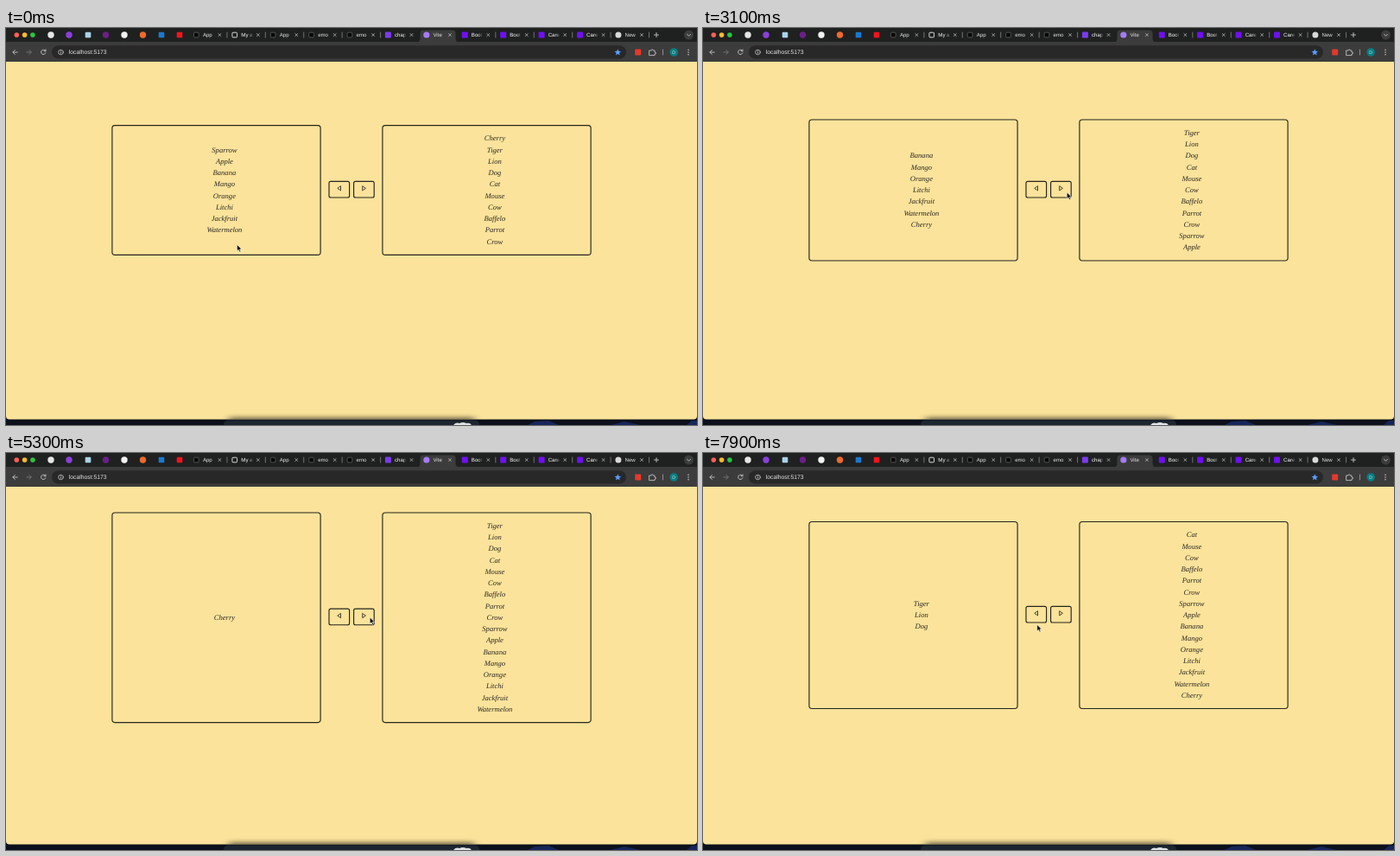
An HTML page for the animation above (8000 ms loop, 800x459 px).

```html
<!DOCTYPE html>
<html lang="en">
<head>
<meta charset="utf-8">
<title>List transfer</title>
<style>
  html, body { margin: 0; width: 100%; height: 100%; overflow: hidden; background: #0b101c; }
  svg { display: block; width: 800px; height: 459px; text-rendering: geometricPrecision; }
  .ui { font-family: "Liberation Sans", Roboto, sans-serif; fill: #e3e3e3; }
  .item { font: italic 8.55px "Apple Chancery", "Liberation Serif", serif; fill: #2b2822; text-anchor: middle; }
  .line { fill: none; stroke: #c7c7c7; stroke-linecap: round; stroke-linejoin: round; }
  .frame { fill: none; stroke: #27241d; stroke-width: 1.15; }
</style>
</head>
<body>
<svg id="stage" viewBox="0 0 800 459" xmlns="http://www.w3.org/2000/svg">
  <defs>
    <linearGradient id="fade">
      <stop offset=".65" stop-color="#fff"/>
      <stop offset="1" stop-color="#fff" stop-opacity="0"/>
    </linearGradient>
    <filter id="soft" x="-20%" y="-200%" width="140%" height="500%"><feGaussianBlur stdDeviation="5 2.5"/></filter>
    <clipPath id="pageClip"><path d="M0 39H800V448.500Q800 452.500 796 452.500H4Q0 452.500 0 448.500Z"/></clipPath>
  </defs>

  <rect width="800" height="459" fill="#0b101c"/>
  <g clip-path="url(#pageClip)">
    <rect y="39" width="800" height="414" fill="#fbe39b"/>
    <rect x="258" y="450" width="284" height="8" fill="#4a4330" opacity=".75" filter="url(#soft)"/>
  </g>
  <rect x="252" y="453.500" width="296" height="12" rx="5" fill="#1c2530"/>
  <path d="M518 459Q521 455.500 525 457Q529 455 533 457Q537 456 539 459Z" fill="#dfe3e6"/>
  <path d="M604 459L612 455L628 454L640 459ZM700 459L716 455L734 459ZM788 459L794 454H800V459Z" fill="#16265a"/>

  <rect width="800" height="17" fill="#1f2020"/>
  <rect y="16" width="800" height="23" fill="#3c3c3c"/>
  <path d="M476 16.500Q479.500 16 479.500 12V6Q479.500 2.500 483 2.500H517Q520.500 2.500 520.500 6V12Q520.500 16 524 16.500Z" fill="#3c3c3c"/>
  <rect x="53" y="20.300" width="665" height="15.200" rx="7.600" fill="#282828"/>
  <g id="chrome"></g>
  <g id="page"></g>
  <g id="cursor">
    <g id="denied">
      <circle cx="4" cy="10" r="3.500" fill="#d5d3cd" stroke="#66645f" stroke-width="1"/>
      <path d="M1.700 7.700L6.300 12.300" stroke="#66645f" stroke-width="1"/>
    </g>
    <path d="M0 0V7.300L1.750 5.800L2.900 8.500L4.200 7.950L3.050 5.350H5.300Z" fill="#000" stroke="#fff" stroke-width=".55"/>
  </g>
</svg>
<script>
const LOOP = 8000, STEP = 100;
const ROW = 13.25, MID = 187.5, MIN_TOP = 69;
const $ = id => document.getElementById(id);

function add(parent, tag, attrs, text) {
  const el = document.createElementNS("http://www.w3.org/2000/svg", tag);
  for (const key in attrs) el.setAttribute(key, attrs[key]);
  if (text) el.textContent = text;
  parent.append(el);
  return el;
}

// Browser bar
const chrome = $("chrome");
const dot = (x, y, r, fill) => add(chrome, "circle", { cx: x, cy: y, r, fill });
const square = (x, y, s, fill, more) =>
  add(chrome, "rect", { x: x - s / 2, y: y - s / 2, width: s, height: s, rx: 1, fill, ...more });
const line = (d, more) => add(chrome, "path", { class: "line", d, "stroke-width": 0.9, ...more });
const label = (x, y, size, text, more) =>
  add(chrome, "text", { class: "ui", x, y, "font-size": size, ...more }, text);

["#ff5f57", "#febc2e", "#28c840"].forEach((c, i) => dot(12.3 + i * 9.3, 8, 2.8, c));
const pinned = [
  [52, "#e6e6e6", 1], [73, "#8b3fd9", 1], [95, "#a9d3ea", 0], [115.500, "#6b1f87", 1],
  [137, "#f2f2f2", 1], [158.500, "#ef6a2c", 1], [180, "#1b78d0", 0], [201, "#f5141c", 0]
];
for (const [x, c, round] of pinned) round ? dot(x, 8, 3.7, c) : square(x, 8, 6.6, c);

const tabs = [
  ["App", "box"], ["My a", "hollow"], ["App", "box"], ["emo", "box"], ["emo", "box"], ["chap", "#7c3aed"],
  ["Vite", "disc"], ["Boot", "#6f10f2"], ["Boot", "#6f10f2"], ["Care", "#6f10f2"], ["Care", "#6f10f2"], ["New", "pale"]
];
tabs.forEach(([name, icon], i) => {
  const x = 220.3 + i * 44.42;
  if (icon === "box") square(x, 8, 5.6, "#080808", { stroke: "#777", "stroke-width": 0.6 });
  else if (icon === "hollow") square(x, 8, 5.6, "none", { stroke: "#eee", "stroke-width": 0.9 });
  else if (icon === "disc") dot(x, 8, 3.6, "#a67bf5");
  else if (icon === "pale") dot(x, 8, 3.5, "#d9d9d9");
  else square(x, 8, 7, icon);
  label(x + 7.6, 10.1, 6.1, name, name.length > 3 && name !== "Vite" ? { style: "fill:url(#fade)" } : {});
  line(`M${x + 25.6} 6.500l3 3m0 -3l-3 3`, { "stroke-width": 0.7 });
  if (i !== 5 && i !== 6) line(`M${x + 35.6} 5v6`, { "stroke-width": 0.5, stroke: "#555" });
});
line("M753 5.500v5M750.500 8h5");
dot(790.5, 8, 5.5, "#3c3c3c");
line("M788.500 7.200l2 2l2 -2");

const hover = dot(43.3, 28, 7.8, "#5f5f5f");
line("M13.200 28H8M10.400 25.500L7.900 28L10.400 30.500");
line("M24 28h5.200M26.800 25.500L29.300 28L26.800 30.500", { style: "stroke:#777" });
line("M45.700 26.500A2.700 2.700 0 1 0 45.900 28.800M46 24.900V26.800H44.100");
add(chrome, "circle", { class: "line", cx: 63.5, cy: 28, r: 2.8, "stroke-width": 0.8 });
line("M63.500 27.800v1.500M63.500 26.400v.1", { "stroke-width": 0.8 });
label(72.8, 30.3, 6.8, "localhost:5173");
const star = [...Array(10)].map((_, i) => {
  const a = i * Math.PI / 5, r = i % 2 ? 1.8 : 4;
  return [708.3 + r * Math.sin(a), 28.2 - r * Math.cos(a)];
});
add(chrome, "polygon", { points: star.join(" "), fill: "#5b9cff" });
square(731.7, 28, 7, "#e4392d");
line("M745 26h2.100a1.100 1.100 0 1 1 2.200 0h1.700v2a1.100 1.100 0 1 1 0 2.100v1.500h-6z", { "stroke-width": 0.85 });
line("M760.500 25v6", { stroke: "#666", "stroke-width": 0.6 });
dot(773.2, 28, 4.8, "#087e83");
label(773.2, 30, 5.2, "D", { "text-anchor": "middle" });
[25.3, 28, 30.7].forEach(y => dot(790, y, 0.75, "#d0d0d0"));

// Lists
const fruits = "Apple Banana Mango Orange Litchi Jackfruit Watermelon Cherry".split(" ");
const animals = "Tiger Lion Dog Cat Mouse Cow Baffelo Parrot Crow Sparrow".split(" ");
const RELOAD = 1400;
const toRight = [2900, 3400, 3800, 4200, 4700, 5000, 5300, 5600];
const toLeft = [7100, 7500, 7800];
const SELECT = 5900;

function listsAt(t) {
  if (t < RELOAD) {
    return [["Sparrow", ...fruits.slice(0, -1)], ["Cherry", ...animals.slice(0, -1)]];
  }
  const left = [...fruits], right = [...animals];
  for (const at of toRight) if (t >= at) right.push(left.shift());
  for (const at of toLeft) if (t >= at) left.push(right.shift());
  return [left, right];
}

const page = $("page");

function drawList(items, x, top, height) {
  add(page, "rect", { class: "frame", x, y: top, width: 241.2, height, rx: 3.2 });
  const first = top + height / 2 - (items.length - 1) * ROW / 2 + 2.6;
  items.forEach((name, i) => add(page, "text", { class: "item", x: x + 130, y: first + i * ROW }, name));
}

function drawButton(x, mid, dir, disabled) {
  add(page, "rect", { class: "frame", x, y: mid - 9.3, width: 23.6, height: 18.6, rx: 2 });
  const cx = x + 11.8, cy = mid - 1.4;
  add(page, "path", {
    d: `M${cx + dir * 2} ${cy}L${cx - dir * 1.7} ${cy - 2.6}V${cy + 2.6}Z`,
    fill: "none", stroke: disabled ? "#8a8983" : "#27241d", "stroke-width": 0.85
  });
}

function drawPage(t) {
  const [left, right] = listsAt(t);
  const height = Math.max(left.length, right.length) * ROW + 17.3;
  const top = Math.max(MIN_TOP, MID - height / 2);
  const mid = top + height / 2;
  const empty = left.length === 0;
  const shift = empty ? 0.5 : 0;
  page.replaceChildren();
  if (empty && t >= SELECT) {
    add(page, "rect", {
      x: 402, y: top - 9.7, width: 24.8, height: height + 19, rx: 1,
      fill: "#c3c2c0", stroke: "#aaa79d", "stroke-width": 0.6
    });
  }
  drawList(left, 122.9 - shift, top, height);
  drawList(right, 435.9 + shift, top, height);
  drawButton(374 - shift, mid - 0.8, -1, false);
  drawButton(402.6, mid - 0.8, 1, empty);
}

// Pointer: time, x, y
const path = [
  [0, 267.5, 250.5], [200, 267.5, 250.5], [1100, 46.7, 34], [1500, 46.7, 34],
  [2600, 421.3, 190], [5600, 421.3, 190], [5900, 420.3, 188.6], [6300, 420.3, 188.6],
  [6900, 386.8, 198.5], [LOOP, 386.8, 198.5]
];

function pointerAt(t) {
  const i = path.findIndex(p => p[0] > t);
  const [t0, x0, y0] = path[i - 1], [t1, x1, y1] = path[i];
  const k = (t - t0) / (t1 - t0), e = k * k * (3 - 2 * k);
  return [x0 + (x1 - x0) * e, y0 + (y1 - y0) * e];
}

let shown = -1;
function tick(now) {
  const t = Math.floor(now % LOOP / STEP) * STEP;
  if (t !== shown) {
    shown = t;
    drawPage(t);
    const [x, y] = pointerAt(t);
    $("cursor").setAttribute("transform", `translate(${x} ${y})`);
    const onReload = Math.hypot(x - 43.3, y - 28) < 9;
    hover.setAttribute("visibility", onReload ? "visible" : "hidden");
    const denied = t >= toRight[7] && t < toLeft[0] && x > 402;
    $("denied").setAttribute("visibility", denied ? "visible" : "hidden");
  }
  requestAnimationFrame(tick);
}
tick(performance.now());
</script>
</body>
</html>
```
